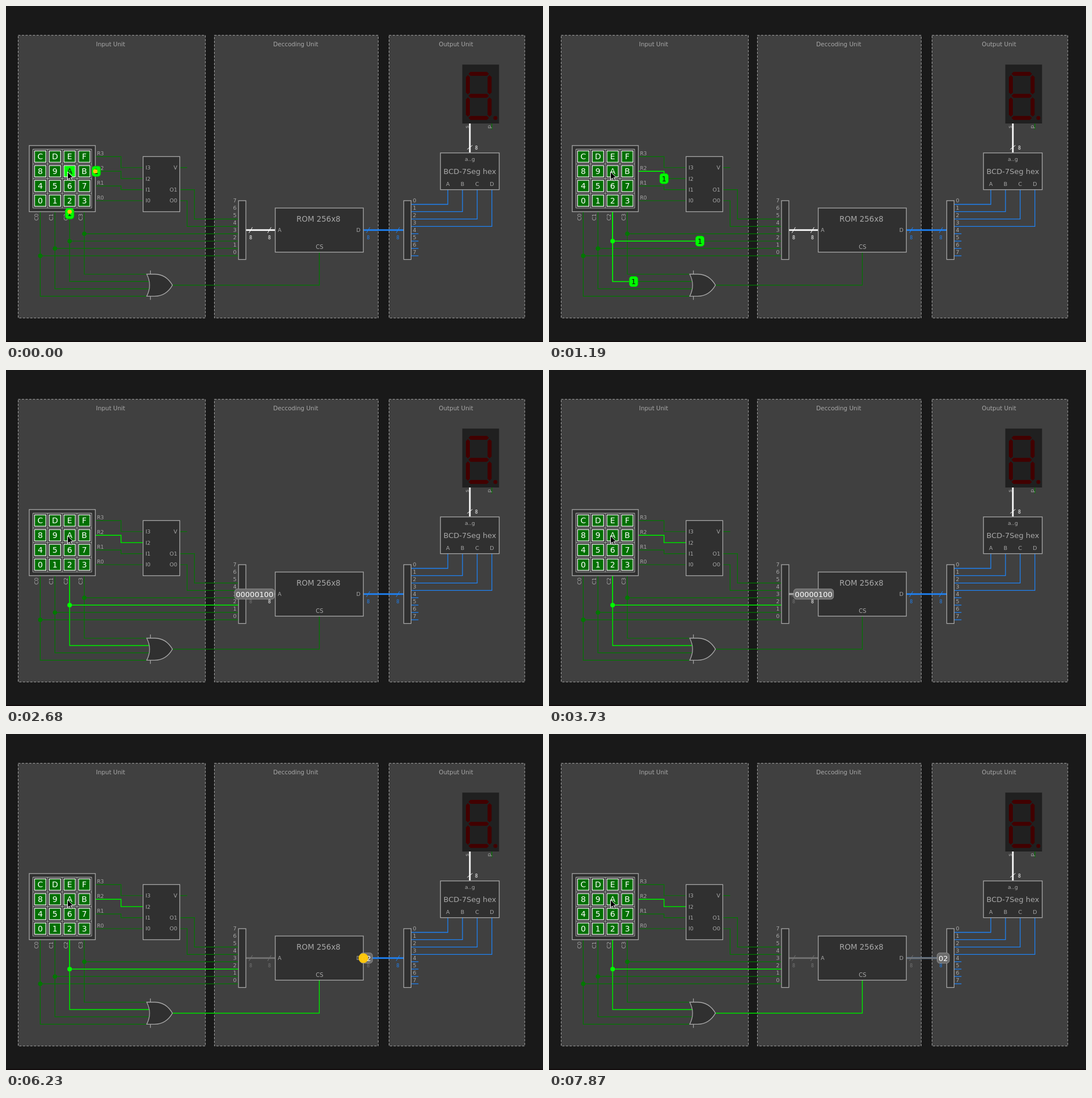
Animation, 947 px wide and 592 px high, one loop 8000 ms. Source, as an HTML page with a canvas:

```html
<!DOCTYPE html>
<html lang="en">
<head>
<meta charset="utf-8">
<title>Keypad decoder circuit</title>
<style>
html, body { margin: 0; width: 100%; height: 100%; overflow: hidden; background: #191919; }
canvas { display: block; }
</style>
</head>
<body>
<canvas id="stage" width="947" height="592"></canvas>
<script>
const ctx = document.getElementById('stage').getContext('2d');
const LOOP = 8000, STEP = 148.4;
const INK = '#a8a8a8', BODY = '#303030', LOW = '#007800', HIGH = '#00ff00', LIT = '#00f000';
const BLUE = '#1e82f5', GREY = '#747474', WHITE = '#fff';

// The circuit sits on a grid; X and Y turn grid units into pixels.
const UNIT = 12.95;
const X = u => 60.4 + u * UNIT;
const Y = v => 343 + v * UNIT;
const BUS_Y = Y(4);

// Signals travel along a path from tick `start` for `span` ticks.
const press = { start: -0.15, span: 13.65 };
const address = { start: 14.2, span: 12.8 };
const select = { start: 28.05, span: 12.2 };
const data = { start: 41.04, span: 13.1 };

const rowPath = [[7.55, -4], [11, -4], [11, -3], [14, -3]];
const branchPath = [[4, 1.5], [4, 5.5], [26.6, 5.5]];
const gatePath = [[4, 1.5], [4, 11], [15.2, 11]];
const selectPath = [[18, 11.5], [38, 11.5], [38, 7]];

const progress = (sig, k) => Math.max(0, Math.min(1, (k - sig.start) / sig.span));

function box(x, y, r, b, fill = BODY, stroke = INK, width = 1.3) {
  ctx.fillStyle = fill;
  ctx.fillRect(x, y, r - x, b - y);
  if (!stroke) return;
  ctx.strokeStyle = stroke;
  ctx.lineWidth = width;
  ctx.strokeRect(x, y, r - x, b - y);
}

const gridBox = (u, v, r, b) => box(X(u), Y(v), X(r), Y(b));

function line(points, color, width = 1.2) {
  ctx.beginPath();
  for (const [u, v] of points) ctx.lineTo(X(u), Y(v));
  ctx.strokeStyle = color;
  ctx.lineWidth = width;
  ctx.stroke();
}

function disc(x, y, r, color) {
  ctx.beginPath();
  ctx.arc(x, y, r, 0, Math.PI * 2);
  ctx.fillStyle = color;
  ctx.fill();
}

function text(s, x, y, size = 9.5, color = INK, align = 'center') {
  ctx.font = `${size}px "DejaVu Sans", sans-serif`;
  ctx.textAlign = align;
  ctx.fillStyle = color;
  ctx.fillText(s, x, y + size * 0.365);
}

function upright(s, x, y) {
  ctx.save();
  ctx.translate(x, y);
  ctx.rotate(-Math.PI / 2);
  text(s, 0, 0);
  ctx.restore();
}

// First part of a path, up to fraction f of its length.
function cut(path, f) {
  const len = path.slice(1).map(([x, y], i) => Math.hypot(x - path[i][0], y - path[i][1]));
  let left = f * len.reduce((a, b) => a + b, 0);
  const out = [path[0]];
  for (let i = 0; i < len.length; i++) {
    const [ax, ay] = path[i], [bx, by] = path[i + 1];
    const q = Math.min(1, left / len[i]);
    out.push([ax + (bx - ax) * q, ay + (by - ay) * q]);
    left -= len[i];
    if (left <= 0) break;
  }
  return out;
}

function badge(label, x, y, w, fill, edge, color) {
  ctx.beginPath();
  ctx.roundRect(x - w / 2, y - 9, w, 18, 4.5);
  ctx.fillStyle = fill;
  ctx.fill();
  ctx.strokeStyle = edge;
  ctx.lineWidth = 1;
  ctx.stroke();
  text(label, x, y, 13, color);
}

function ripple(sig, k, u, v) {
  const r = (k - sig.start) * 8.5 + (sig === press ? 2.5 : 0.5);
  if (k < sig.start || r >= 28.5) return;
  ctx.globalAlpha = 1 - (r / 28.5) ** 3;
  disc(X(u), Y(v), r, '#ffc80a');
  ctx.globalAlpha = 1;
}

function trail(path, sig, k, fullPath = path) {
  const p = progress(sig, k);
  if (p >= 1) line(fullPath, LIT, 1.35);
  else if (p > 0) line(cut(path, p), HIGH, 1.6);
}

function carrier(path, sig, k) {
  const p = progress(sig, k);
  if (p <= 0 || p >= 1) return;
  const [u, v] = cut(path, p).pop();
  badge('1', X(u), Y(v), 15, HIGH, '#00c800', '#101010');
}

function panels() {
  const list = [['Input Unit', 21.5, 351.6, 184.5], ['Deccoding Unit', 367.5, 656.4, 511], ['Output Unit', 675.5, 914.8, 793.5]];
  for (const [title, x, r, mid] of list) {
    ctx.setLineDash([UNIT * 0.3, UNIT * 0.2]);
    box(x, 51.6, r, 549.7, '#404040', '#a4a4a4', 1);
    ctx.setLineDash([]);
    text(title, mid, 67.5, 10.4);
  }
}

function wires() {
  line([[7.5, -6], [11, -6], [11, -4.5], [14, -4.5]], LOW);
  line(rowPath, LOW);
  line([[7.5, -2], [11, -2], [11, -1.5], [14, -1.5]], LOW);
  line([[7.5, 0], [14, 0]], LOW);
  line([[19, -4.5], [20, -4.5]], LOW);
  line([[19, -1.5], [21, -1.5], [21, 2.5], [27, 2.5]], LOW);
  line([[19, 0], [20, 0], [20, 3.5], [27, 3.5]], LOW);
  for (let i = 0; i < 4; i++) {
    const u = i * 2, v = 7.5 - i, out = 55.5 + i * 2;
    line([[u, 1.5], [u, 13 - i], [15.2, 13 - i]], LOW);
    line([[u, v], [27, v]], LOW);
    disc(X(u), Y(v), 3.8, LOW);
    line([[out, -1.5], [out, 0.5 + i], [50.5, 0.5 + i]], BLUE, 1.3);
    line([[50.5, 4.5 + i], [51.5, 4.5 + i]], BLUE, 1.3);
  }
  line(selectPath, LOW);
  line([[61.5, -10.5], [61.5, -9.7]], LOW, 1.3);
}

function keypad(k) {
  gridBox(-1.5, -7.5, 7.5, 1.5);
  for (let i = -1; i <= 7; i += 2) {
    line([[i, -7], [i, 1]], INK, 1.1);
    line([[-1, i - 6], [7, i - 6]], INK, 1.1);
  }
  [...'CDEF89AB45670123'].forEach((c, i) => {
    const x = X(i % 4 * 2), y = Y(Math.floor(i / 4) * 2 - 6);
    const down = c === 'A' && k < 1;
    box(x - 10, y - 10, x + 10, y + 10, down ? HIGH : '#007000', '#f4f4f4');
    text(c, x, y, 14, down ? '#101010' : WHITE);
  });
  for (let i = 0; i < 4; i++) {
    text('R' + (3 - i), 166.5, 259.5 + i * 26, 9);
    upright('C' + i, 54 + i * 26, 372);
  }
}

function gate() {
  line([[15, 9.5], [15, 10]], INK);
  line([[15, 13], [15, 13.5]], INK);
  const left = X(14.5), top = Y(10), bottom = Y(13), mid = Y(11.5), tip = X(18);
  ctx.beginPath();
  ctx.moveTo(left, top);
  ctx.lineTo(262, top);
  ctx.bezierCurveTo(278, top, 287, top + 8, tip, mid);
  ctx.bezierCurveTo(287, bottom - 8, 278, bottom, 262, bottom);
  ctx.lineTo(left, bottom);
  ctx.quadraticCurveTo(left + 10, mid, left, top);
  ctx.closePath();
  ctx.fillStyle = BODY;
  ctx.fill();
  ctx.strokeStyle = INK;
  ctx.lineWidth = 1.3;
  ctx.stroke();
}

function chips() {
  gridBox(14, -6, 19, 1.5);
  for (let i = 0; i < 4; i++) text('I' + (3 - i), 246, Y(-4.5 + i * 1.5), 9.5, INK, 'left');
  text('V', 302, Y(-4.5), 9.5, INK, 'right');
  text('O1', 302, Y(-1.5), 9.5, INK, 'right');
  text('O0', 302, Y(0), 9.5, INK, 'right');

  gridBox(27, 0, 28, 8);
  gridBox(49.5, 0, 50.5, 8);
  for (let i = 0; i < 8; i++) {
    text(7 - i, 403.5, Y(i), 9.5);
    text(i, 720.5, Y(i), 9.5);
  }

  gridBox(32, 1, 44, 7);
  text('ROM 256x8', 551, 375, 13.4);
  text('A', 482.5, BUS_Y);
  text('D', 621.5, BUS_Y);
  text('CS', 553, 424, 10);

  gridBox(54.5, -6.5, 62.5, -1.5);
  text('a..g', 818, 270);
  text('BCD-7Seg hex', 818, 291.5, 13);
  [...'ABCD'].forEach((c, i) => text(c, X(55.5 + i * 2), 314));
}

function segment(x, y, len, vertical) {
  ctx.save();
  ctx.translate(x, y);
  if (vertical) ctx.rotate(Math.PI / 2);
  const h = len / 2;
  ctx.beginPath();
  for (const [a, b] of [[-h, 0], [3.5 - h, -3.5], [h - 3.5, -3.5], [h, 0], [h - 3.5, 3.5], [3.5 - h, 3.5]]) ctx.lineTo(a, b);
  ctx.fillStyle = '#420000';
  ctx.fill();
  ctx.restore();
}

function display() {
  box(804.7, 103.2, 869.5, 207, '#202020', null);
  for (const y of [119.5, 158.3, 197.3]) segment(833.6, y, 36, false);
  for (const x of [814.5, 852.8]) {
    segment(x, 138.8, 34, true);
    segment(x, 178, 34, true);
  }
  disc(863, 197.3, 3.5, '#420000');
  upright('s', 812.5, 213);
  upright('p', 852, 213);
  box(816.6, 207, 819.4, 258, WHITE, null);
  slash(818, 249, 4.5, 3.5, WHITE);
  text('8', 829.5, 250, 8, WHITE);
}

function slash(x, y, dx, dy, color) {
  ctx.beginPath();
  ctx.moveTo(x - dx, y + dy);
  ctx.lineTo(x + dx, y - dy);
  ctx.strokeStyle = color;
  ctx.lineWidth = 1;
  ctx.stroke();
}

function bus(u, end, sig, k, color, core) {
  const p = progress(sig, k), x = X(u), r = X(end);
  const bar = (to, h, c) => box(x, BUS_Y - h / 2, to, BUS_Y + h / 2, c, null);
  bar(r, 2.8, p >= 1 ? GREY : color);
  if (p > 0 && p < 1) bar(x + (r - x) * p, core, GREY);
  for (const [mark, passed] of [[x + 8.5, p > 0], [r - 10.3, p >= 1]]) {
    const c = passed ? GREY : color;
    slash(mark, BUS_Y, 3, 5, c);
    text('8', mark, 408.5, 8, c);
  }
}

function busBadge(label, u, end, sig, k, w) {
  const p = progress(sig, k);
  if (p > 0 && p < 1) badge(label, X(u + (end - u) * p), BUS_Y, w, '#6c6c6c', '#929292', WHITE);
}

function cursor() {
  ctx.beginPath();
  for (const [x, y] of [[0, 0], [0, 14], [3.3, 11], [5.6, 16.3], [8, 15.2], [5.7, 10.2], [10, 10]]) ctx.lineTo(108.5 + x, 292 + y);
  ctx.closePath();
  ctx.fillStyle = '#000';
  ctx.fill();
  ctx.strokeStyle = WHITE;
  ctx.lineWidth = 1;
  ctx.stroke();
}

function draw(k) {
  box(0, 0, 947, 592, '#191919', null);
  box(0, 590, 947, 592, '#120c0d', null);
  panels();
  wires();
  trail(rowPath, press, k);
  trail(branchPath, press, k, [[4, 1.5], [4, 5.5], [27, 5.5]]);
  trail(gatePath, press, k);
  if (k >= 2) disc(X(4), Y(5.5), 4, HIGH);
  trail(selectPath, select, k);
  bus(28, 32, address, k, WHITE, 1.4);
  bus(44, 49.5, data, k, BLUE, 2.8);
  keypad(k);
  gate();
  chips();
  display();

  for (const path of [rowPath, branchPath, gatePath]) carrier(path, press, k);
  carrier(selectPath, select, k);
  busBadge('00000100', 28, 32, address, k, 70);
  busBadge('02', 44, 49.5, data, k, 21.5);
  ripple(press, k, 7.5, -4);
  ripple(press, k, 4, 1.5);
  ripple(address, k, 28, 4);
  ripple(select, k, 18, 11.5);
  ripple(data, k, 44, 4);
  cursor();
}

function tick() {
  const t = performance.now() % LOOP;
  draw(Math.min(53, Math.floor((t + 6) / STEP)));
  requestAnimationFrame(tick);
}
tick();
</script>
</body>
</html>
```
